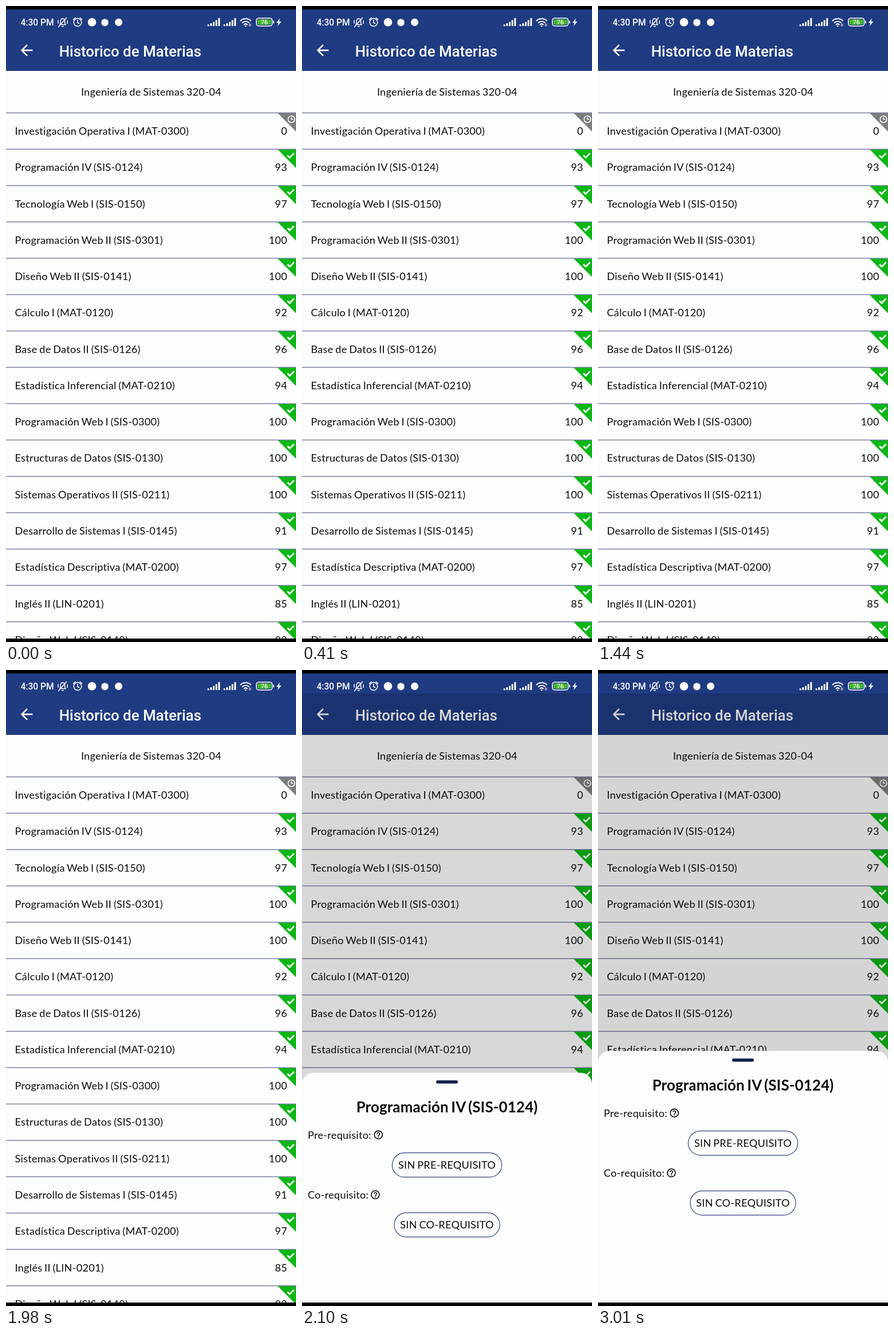
Write an HTML page that moves like this. It is 506 px wide and 1107 px high and loops after 3500 ms.

```html
<!DOCTYPE html>
<html lang="es">
<head>
<meta charset="utf-8">
<title>Historico de Materias</title>
<style>
  html, body { margin: 0; width: 100%; height: 100%; overflow: hidden; background: #000; }
  svg { display: block; width: 506px; height: 1107px; }
  text { font-family: Lato, sans-serif; font-size: 18.04px; letter-spacing: .32px; word-spacing: -.07em; fill: #0c0c0c; }
  .mid { text-anchor: middle; }
  .end { text-anchor: end; }
  .bar { font-family: Roboto, sans-serif; font-weight: 500; fill: #fff; letter-spacing: 0; word-spacing: 0; }
  .line { fill: none; stroke: #fff; stroke-linecap: round; stroke-linejoin: round; }
  .pill { fill: none; stroke: #33477f; stroke-width: 1.2; }
</style>
</head>
<body>
<svg viewBox="0 0 506 1107">
  <defs>
    <clipPath id="screen"><rect y="6" width="506" height="1095"/></clipPath>
    <path id="help" d="M11 18h2v-2h-2v2zm1-16C6.48 2 2 6.48 2 12s4.48 10 10 10 10-4.48 10-10S17.52 2 12 2zm0 18c-4.41 0-8-3.59-8-8s3.59-8 8-8 8 3.59 8 8-3.59 8-8 8zm0-14c-2.21 0-4 1.79-4 4h2c0-1.1.9-2 2-2s2 .9 2 2c0 2-3 1.75-3 5h2c0-2.25 3-2.5 3-5 0-2.21-1.79-4-4-4z"/>
    <g id="signal" fill="#fff">
      <rect y="11" width="3" height="3" rx="1"/>
      <rect x="4.7" y="9" width="3" height="5" rx="1"/>
      <rect x="9.4" y="6.5" width="3" height="7.5" rx="1"/>
      <rect x="14.1" y="3.5" width="3" height="10.5" rx="1"/>
      <rect x="18.8" width="3" height="14" rx="1"/>
    </g>
  </defs>
  <rect width="506" height="1107"/>
  <g clip-path="url(#screen)">
    <rect y="6" width="506" height="1095" fill="#fdfdfd"/>
    <rect y="6" width="506" height="107" fill="#1f3b82"/>

    <text class="bar" x="25.5" y="34" style="font-size:15.6px">4:30 PM</text>
    <g class="line" stroke-width="1.5">
      <path d="M94 32.5h10l-1.4-2.6v-4.2a3.7 3.7 0 0 0-7.4 0v4.2zM97.7 35.6h2.6M91.5 36.5L105.5 20.5M91 25v5M107 25.5v5"/>
      <circle cx="125" cy="28.5" r="6.8"/>
      <path d="M125 24.8V29l2.8 1.5M117.4 23.6l3.5-3M132.6 23.6l-3.5-3"/>
    </g>
    <g fill="#fff">
      <circle cx="150" cy="28.3" r="7.3"/>
      <circle cx="172.5" cy="28.8" r="6.3"/>
      <circle cx="196.5" cy="28.3" r="6.5"/>
    </g>
    <use href="#signal" x="351.5" y="21"/>
    <use href="#signal" x="379.5" y="21"/>
    <g class="line" stroke-width="2.1">
      <path d="M409.5 25.5a12.5 12.5 0 0 1 17.5 0M412.5 29a8.3 8.3 0 0 1 11.5 0M415.6 32.3a4 4 0 0 1 5.3 0"/>
      <path d="M424.5 31v4M427 35v-4" stroke-width="1"/>
    </g>
    <circle cx="418.2" cy="35" r="1.5" fill="#fff"/>
    <rect x="437" y="21.2" width="27.5" height="13.6" rx="4" fill="none" stroke="#fff" stroke-width="1.6"/>
    <rect x="439" y="23.2" width="23.5" height="9.6" rx="2" fill="#45b52e"/>
    <rect x="466" y="25.7" width="1.8" height="4.6" rx=".8" fill="#fff"/>
    <text class="bar mid" x="450.7" y="31.8" style="font-size:10.5px">76</text>
    <path d="M478 21.5l-6.2 7.7h3.7l-1.5 5.8 6.4-8h-3.8z" fill="#fff"/>

    <path d="M20 11H7.83l5.59-5.59L12 4l-8 8 8 8 1.41-1.41L7.83 13H20v-2z" fill="#fff" transform="translate(20.6 61.7) scale(1.2885)"/>
    <text class="bar" x="92.8" y="87.6" style="font-size:25.77px">Historico de Materias</text>

    <text class="mid" x="253.3" y="156">Ingeniería de Sistemas 320-04</text>
    <g id="rows"></g>

    <rect id="dim" y="41" width="506" height="1060" opacity="0"/>

    <g id="sheet">
      <path d="M0 1101V683a20 20 0 0 1 20-20H486a20 20 0 0 1 20 20v900H0z" fill="#fdfdfd"/>
      <rect x="234" y="676.3" width="38" height="5.4" rx="2.6" fill="#101f4b"/>
      <text class="mid" x="253" y="731.5" style="font-size:25.77px;font-weight:700;letter-spacing:.19px">Programación IV (SIS-0124)</text>
      <text x="10" y="777.8">Pre-requisito:</text>
      <use href="#help" transform="translate(124 761.8) scale(.775)"/>
      <rect class="pill" x="157.4" y="802.4" width="191.2" height="42.2" rx="21.1"/>
      <text class="mid" x="253" y="829.8">SIN PRE-REQUISITO</text>
      <text x="10" y="882">Co-requisito:</text>
      <use href="#help" transform="translate(118.7 866) scale(.775)"/>
      <rect class="pill" x="160.9" y="906.6" width="184.2" height="42.2" rx="21.1"/>
      <text class="mid" x="253" y="934">SIN CO-REQUISITO</text>
    </g>
  </g>
</svg>
<script>
const LOOP = 3500, PITCH = 63.27;

const subjects = [
  ["Investigación Operativa I (MAT-0300)", 0],
  ["Programación IV (SIS-0124)", 93],
  ["Tecnología Web I (SIS-0150)", 97],
  ["Programación Web II (SIS-0301)", 100],
  ["Diseño Web II (SIS-0141)", 100],
  ["Cálculo I (MAT-0120)", 92],
  ["Base de Datos II (SIS-0126)", 96],
  ["Estadística Inferencial (MAT-0210)", 94],
  ["Programación Web I (SIS-0300)", 100],
  ["Estructuras de Datos (SIS-0130)", 100],
  ["Sistemas Operativos II (SIS-0211)", 100],
  ["Desarrollo de Sistemas I (SIS-0145)", 91],
  ["Estadística Descriptiva (MAT-0200)", 97],
  ["Inglés II (LIN-0201)", 85],
  ["Diseño Web I (SIS-0140)", 93]
];

const check = '<path class="line" stroke-width="2.8" style="stroke-linecap:butt;stroke-linejoin:miter" d="M491 10.6l4 4 7.6-7.6"/>';
const clock = '<g class="line" stroke-width="1.6"><circle cx="498" cy="11" r="5.8"/><path d="M498 7.8v3.5h2.6"/></g>';

document.getElementById("rows").innerHTML = subjects.map(([name, mark], i) => `
  <g transform="translate(0 ${186 + i * PITCH})">
    <path d="M473.8 .3H506V32.5z" fill="${mark ? "#0bb715" : "#7e7e7e"}"/>
    ${mark ? check : clock}
    <rect y="-.7" width="506" height="1.4" fill="#7479a2"/>
    <text x="15.5" y="38">${name}</text>
    <text class="end" x="490.8" y="38">${mark}</text>
  </g>`).join("");

// Time in ms, sheet offset in px, backdrop opacity
const steps = [
  [0, 444, 0],
  [2020, 270, .06],
  [2060, 100, .12],
  [2100, 38, .15],
  [2140, 20, .157],
  [2190, 5, .16],
  [2230, 0, .16]
];

const sheet = document.getElementById("sheet");
const dim = document.getElementById("dim");

function draw() {
  const t = performance.now() % LOOP;
  const [, offset, shade] = steps.findLast(([at]) => at <= t);
  sheet.setAttribute("transform", `translate(0 ${offset})`);
  dim.setAttribute("opacity", shade);
  requestAnimationFrame(draw);
}
draw();
</script>
</body>
</html>
```
